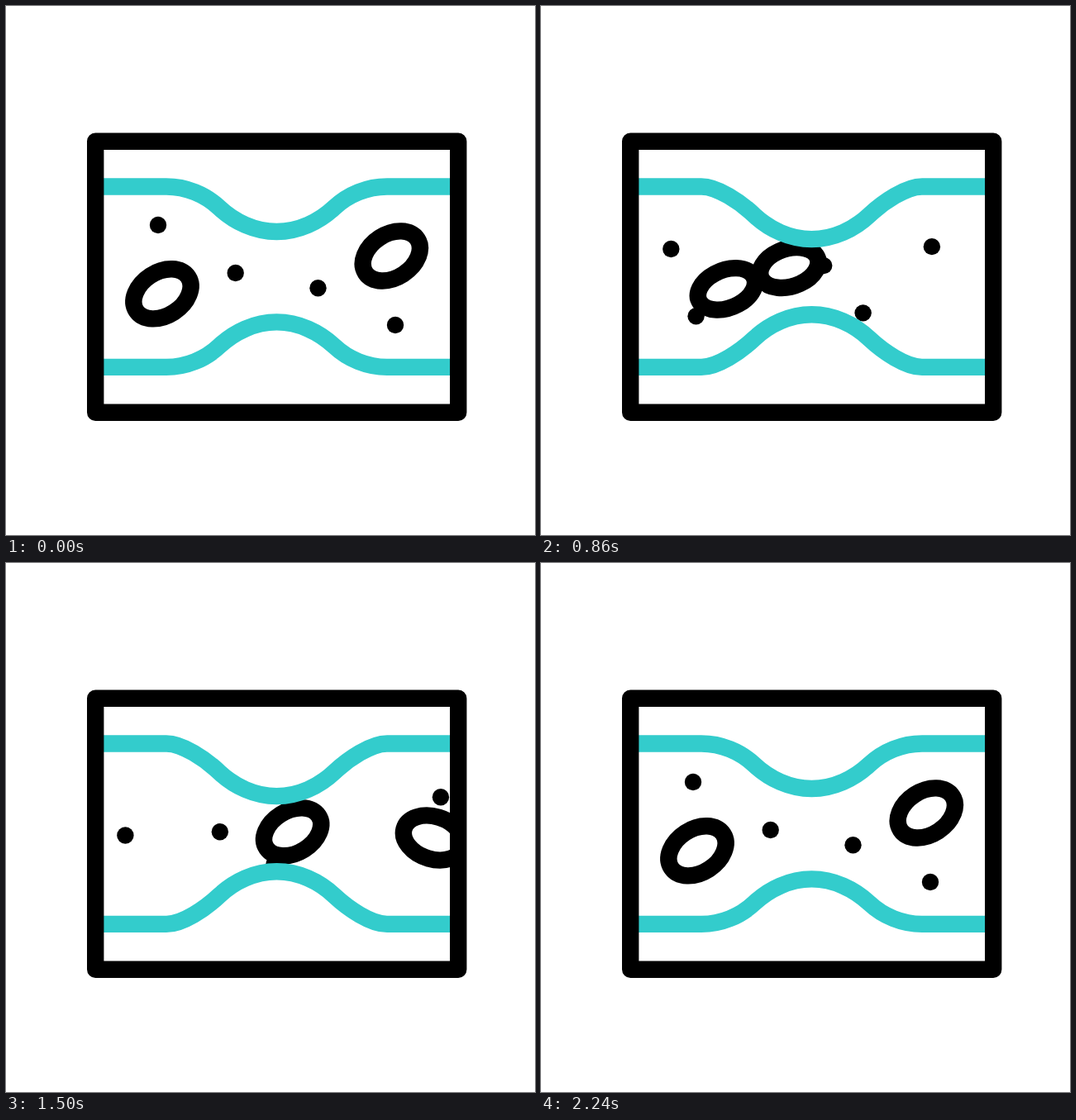
These frames come from a looping animation (640 px wide and 640 px high, 2.4 s). An HTML page:

```html
<!DOCTYPE html>
<html lang="en">
<head>
<meta charset="utf-8">
<title>Vessel</title>
<style>
  html, body { margin: 0; width: 100%; height: 100%; overflow: hidden; background: #fff; }
  svg { display: block; width: 100%; height: 100%; }
  ellipse { vector-effect: non-scaling-stroke; }
</style>
</head>
<body>
<svg viewBox="0 0 640 640" fill="none" stroke-width="20.4">
  <clipPath id="inside"><rect x="108" y="164" width="439" height="328"/></clipPath>
  <g clip-path="url(#inside)">
    <g id="particles"></g>
    <g stroke="#33cccc">
      <path id="upper"/>
      <path id="lower"/>
    </g>
  </g>
  <rect x="108.2" y="163.8" width="439" height="328" stroke="#000" stroke-linejoin="round"/>
</svg>
<script>
const LOOP = 2400, STEP = 20, START = 200, TRAVEL = 2040;

// Each particle drifts through a few turning points [time from home, x, y].
// A second copy, one journey behind, arrives home as the first one leaves.
const dots = [
  [[-560, 75, 310], [0, 184, 265], [600, 325, 317], [1140, 480, 291]],
  [[-900, 119, 340], [-276, 218, 299], [0, 277.7, 323], [560, 361, 371], [1140, 527, 373]],
  [[-1700, 102, 318], [-1220, 185, 282], [-310, 325, 364], [0, 377.5, 341.3], [820, 496, 279], [1140, 539, 308]],
  [[-1700, 128, 403], [-1136, 233, 354], [-560, 366, 369], [0, 471, 386], [500, 545, 407]]
];
const cells = [
  { turn: u => 0.07 * Math.max(0, u - 600),
    path: [[-560, 81, 319], [0, 189, 348.3], [600, 280, 315], [1480, 578, 337]] },
  { turn: u => 0.13 * Math.max(0, u),
    path: [[-1840, 105, 298], [-1440, 213, 344], [-560, 381, 320.5], [0, 466.3, 302.4], [500, 570, 298]] }
];

const byId = id => document.getElementById(id);
const clamp = (v, low, high) => Math.min(high, Math.max(low, v));

function set(node, attrs) {
  for (const name in attrs) node.setAttribute(name, attrs[name]);
  return node;
}

function add(tag, attrs) {
  const node = document.createElementNS("http://www.w3.org/2000/svg", tag);
  return byId("particles").appendChild(set(node, attrs));
}

// Steady drift between turning points, continued beyond both ends
function along(path, u) {
  let i = 1;
  while (i < path.length - 1 && u > path[i][0]) i++;
  const [t0, x0, y0] = path[i - 1], [t1, x1, y1] = path[i];
  const k = (u - t0) / (t1 - t0);
  return [x0 + (x1 - x0) * k, y0 + (y1 - y0) * k];
}

function pinch(t) {
  const s = clamp(1 - Math.abs(t - 1180) / 780, 0, 1);
  return s * s * (3 - 2 * s);
}

function flatten(t) {
  return 1 - 0.18 * clamp(Math.min((t - START) / 560, (1680 - t) / 920), 0, 1);
}

// The middle arc moves as one piece; the shoulders stretch to follow it
function wallPath(k, flip) {
  const middle = 327.5, flat = 218.5, drop = 14.4 * k;
  const left = [
    [100, flat], [194, flat],
    [218 - 7 * k, flat], [241, 228 + drop], [258, 244 + drop],
    [276, 261 + drop], [301, 273 + drop], [middle, 273 + drop]
  ];
  const right = left.slice(0, -1).reverse().map(([x, y]) => [2 * middle - x, y]);
  const points = [...left, ...right].map(([x, y]) => `${x} ${flip ? 655.4 - y : y}`);
  return `M${points[0]}L${points[1]}C${points.slice(2, -1).join(" ")}L${points.at(-1)}`;
}

const particles = [];
for (const delay of [0, TRAVEL]) {
  for (const path of dots) {
    particles.push({ path, delay, node: add("circle", { r: 10.2, fill: "#000" }) });
  }
  for (const { path, turn } of cells) {
    particles.push({ path, turn, delay, node: add("ellipse", { rx: 37.5, ry: 26.3, stroke: "#000" }) });
  }
}

function draw(t) {
  const drift = clamp(t - START, 0, TRAVEL);
  for (const { path, turn, delay, node } of particles) {
    const u = drift - delay;
    const shape = turn ? ` rotate(${turn(u)}) scale(1 ${flatten(t)}) rotate(-33)` : "";
    set(node, { transform: `translate(${along(path, u)})` + shape });
  }
  const k = pinch(t);
  set(byId("upper"), { d: wallPath(k, false) });
  set(byId("lower"), { d: wallPath(k, true) });
}

function tick() {
  draw(Math.floor(performance.now() % LOOP / STEP) * STEP);
  requestAnimationFrame(tick);
}
tick();
</script>
</body>
</html>
```
